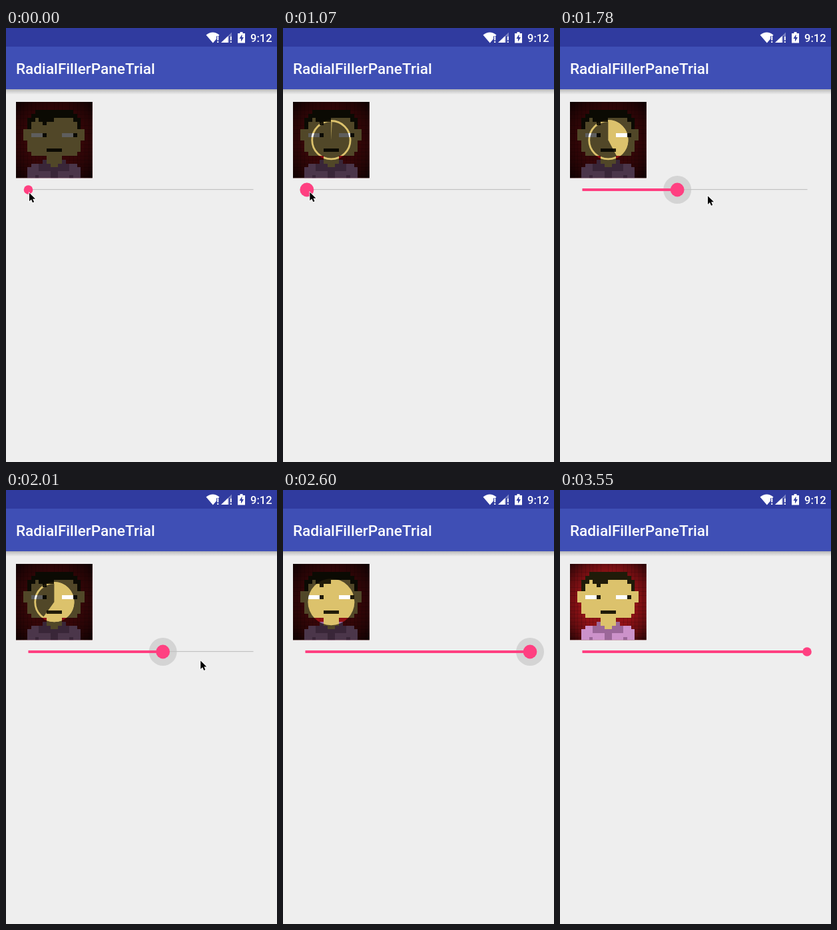
Animation of 407 by 652 pixels, one loop 4.02 s. Source, as an HTML page:

```html
<!DOCTYPE html>
<html lang="en">
<head>
<meta charset="utf-8">
<title>RadialFillerPaneTrial</title>
<style>
  html, body { margin: 0; width: 100%; height: 100%; overflow: hidden; background: #eee; }
  svg { display: block; width: 407px; height: 652px; }
  text { font-family: Roboto, sans-serif; font-weight: 500; fill: #fff; }
</style>
</head>
<body>
<svg viewBox="0 0 407 652">
  <defs>
    <linearGradient id="shade" x2="0" y2="1">
      <stop offset="0" stop-color="#b4b4b6"/>
      <stop offset=".45" stop-color="#d3d3d3"/>
      <stop offset="1" stop-color="#eee"/>
    </linearGradient>
    <radialGradient id="vignette" gradientUnits="userSpaceOnUse" cx="72.4" cy="168.400" r="82">
      <stop offset=".5" stop-opacity="0"/>
      <stop offset=".75" stop-opacity=".32"/>
      <stop offset="1" stop-opacity=".75"/>
    </radialGradient>
    <clipPath id="frame"><rect x="15" y="111" width="114.700" height="114.300"/></clipPath>
    <mask id="hole" maskUnits="userSpaceOnUse" x="15" y="111" width="115" height="115">
      <rect x="15" y="111" width="115" height="115" fill="#fff"/>
      <circle id="ring" cx="72.4" cy="168.200" r="28.700" fill="none" stroke="#000" stroke-width="2.800"/>
      <path id="pie"/>
      <circle id="reveal" cx="72.4" cy="168.200"/>
    </mask>
  </defs>

  <rect width="407" height="652" fill="#eee"/>
  <rect y="92" width="407" height="8" fill="url(#shade)"/>
  <rect width="407" height="92" fill="#3f4fb5"/>
  <rect width="407" height="28" fill="#303b9f"/>
  <text x="15" y="69" font-size="22.600">RadialFillerPaneTrial</text>

  <g fill="#fff">
    <path d="M300.500 10.500Q310.500 2.500 320.500 10.500L319 12.200H316V16.500L310.800 22.500Z"/>
    <path d="M317.200 12.500h2v6h-2zm0 7.500h2v2h-2z"/>
    <path d="M323 22L339 6.500V12H335V22Z" opacity=".35"/>
    <path d="M323 22L333.500 12V22Z"/>
    <path d="M336.800 12.500h2v6h-2zm0 7.500h2v2h-2z"/>
    <path d="M348 8h3.500v-2h4v2h3.500v14.500h-11z"/>
  </g>
  <path d="M354.500 9.500L350.500 16H353V20.500L357 14H354.500Z" fill="#303b9f"/>
  <text x="367" y="20.700" font-size="16.500">9:12</text>

  <circle id="halo" cy="243" fill="#d4d4d4"/>
  <g clip-path="url(#frame)">
    <g id="avatar" shape-rendering="crispEdges"></g>
    <rect x="15" y="111" width="115" height="115" opacity=".63" mask="url(#hole)"/>
  </g>

  <rect x="33.500" y="242" width="338" height="1.200" fill="#c2c2c2"/>
  <rect id="bar" x="33.500" y="241" height="4" fill="#ff4081"/>
  <circle id="thumb" cy="243" fill="#ff4081"/>
  <path id="cursor" d="M1 1.800V14.300L3.900 11.500L6 16.200L8.100 15.300L6.100 10.700H10Z"
        stroke="#fff" stroke-width="1.600" paint-order="stroke"/>
</svg>
<script>
const $ = id => document.getElementById(id);
const set = (el, attrs) => { for (const k in attrs) el.setAttribute(k, attrs[k]); };
const clamp = v => Math.max(0, Math.min(1, v));

// Avatar: blocks on a 20 x 20 grid
const CELL = 5.735, LEFT = 15, TOP = 111.9;
const HAIR = '#201b09', SKIN = '#dcc26c', SHIRT = '#cc92ca', FOLD = '#9b6799';

function block(fill, x, y, width, height, opacity = 1) {
  const r = document.createElementNS('http://www.w3.org/2000/svg', 'rect');
  set(r, { fill, opacity, x: LEFT + x * CELL, y: TOP + y * CELL, width: width * CELL, height: height * CELL });
  $('avatar').append(r);
}
// A block centred on the face
const band = (fill, half, y, h) => block(fill, 10 - half, y, half * 2, h);

function drawAvatar() {
  band('#921216', 10, -1, 21);
  for (let i = 0; i < 20; i++) {
    block('#000', i, -1, .15, 21, .14);
    block('#000', 0, i, 20, .15, .14);
  }
  band('url(#vignette)', 10, -1, 21);

  for (let i = 0; i < 3; i++) band(HAIR, 5 + i, 2 + i, 5 - i);
  band(SHIRT, 6, 16, 1);
  band(SHIRT, 7, 17, 3);
  band(FOLD, 4, 16, 2);
  band(FOLD, 3, 15, 1);
  band(FOLD, 1, 18, 2);
  for (const x of [5, 14]) block(FOLD, x, 19, 1, 1);

  band(SKIN, 6, 5, 9);
  band(SKIN, 7, 7, 6);
  band(SKIN, 8, 7, 3);
  band(SKIN, 2, 14, 2);
  band(SKIN, 1, 16, 1);
  block(SKIN, 5, 4, 1, 1);
  block(SKIN, 10, 4, 5, 1);
  block(HAIR, 7, 5, 1, 1);
  for (const x of [4, 12]) {
    block('#fff', x, 8, 3, 1);
    block(HAIR, x + 3, 8, 1, 1);
  }
  band(HAIR, 2, 12, 1);
}

const LOOP = 4020, STEP = 118.4, LAST = 30;
const PRESS = 8, DRAG = 12, FULL = 21;   // steps
const START = 33.5, SPAN = 337.5;

// Distance of the thumb: a slow pull, then a nearly even drag
function pull(k) {
  const slow = 37.5 * clamp((k - PRESS) / (DRAG - PRESS)) ** 2;
  const u = clamp((k - DRAG) / (FULL - DRAG));
  return slow + (SPAN - 37.5) * u + 6 * Math.sin(2 * Math.PI * u);
}

// The pointer hovers first, then runs ahead of the thumb
function pointer(k, d) {
  if (k < 5) {
    const n = Math.min(k, 2);
    return [34 - 3 * n, 246 + n / 2];
  }
  if (k <= PRESS) return [30, 245];
  return [START + d + 2.07 * d ** .62, 245 + 15 * (d / 264) ** 1.6];
}

function sector(part) {
  const a = part * 2 * Math.PI, r = 30;
  const x = 72.4 + r * Math.sin(a), y = 168.2 - r * Math.cos(a);
  return `M72.4 168.2v${-r}A${r} ${r} 0 ${part > .5 ? 1 : 0} 1 ${x} ${y}Z`;
}

function draw(t) {
  const k = Math.min(LAST, Math.floor((t + 8) / STEP));
  const d = pull(k), cx = START + d;
  const done = k >= FULL, busy = d > 0;
  const release = clamp((24 - k) / 2);

  set($('bar'), { width: d });
  set($('thumb'), { cx, r: 6.8 + 3.6 * clamp((k - 7) / 2) * release });
  set($('halo'), { cx, r: 21 * clamp((k - PRESS) / 2), opacity: release });
  set($('cursor'), {
    transform: `translate(${pointer(k, d)})`,
    visibility: k < 20 ? 'visible' : 'hidden'
  });
  set($('ring'), { visibility: busy ? 'visible' : 'hidden' });
  set($('pie'), { d: busy && !done ? sector(d / SPAN) : '' });
  set($('reveal'), { r: done ? 29 + 6 * (k - FULL) : 0 });
}

drawAvatar();
const begin = performance.now();
function tick() {
  draw((performance.now() - begin) % LOOP);
  requestAnimationFrame(tick);
}
tick();
</script>
</body>
</html>
```
